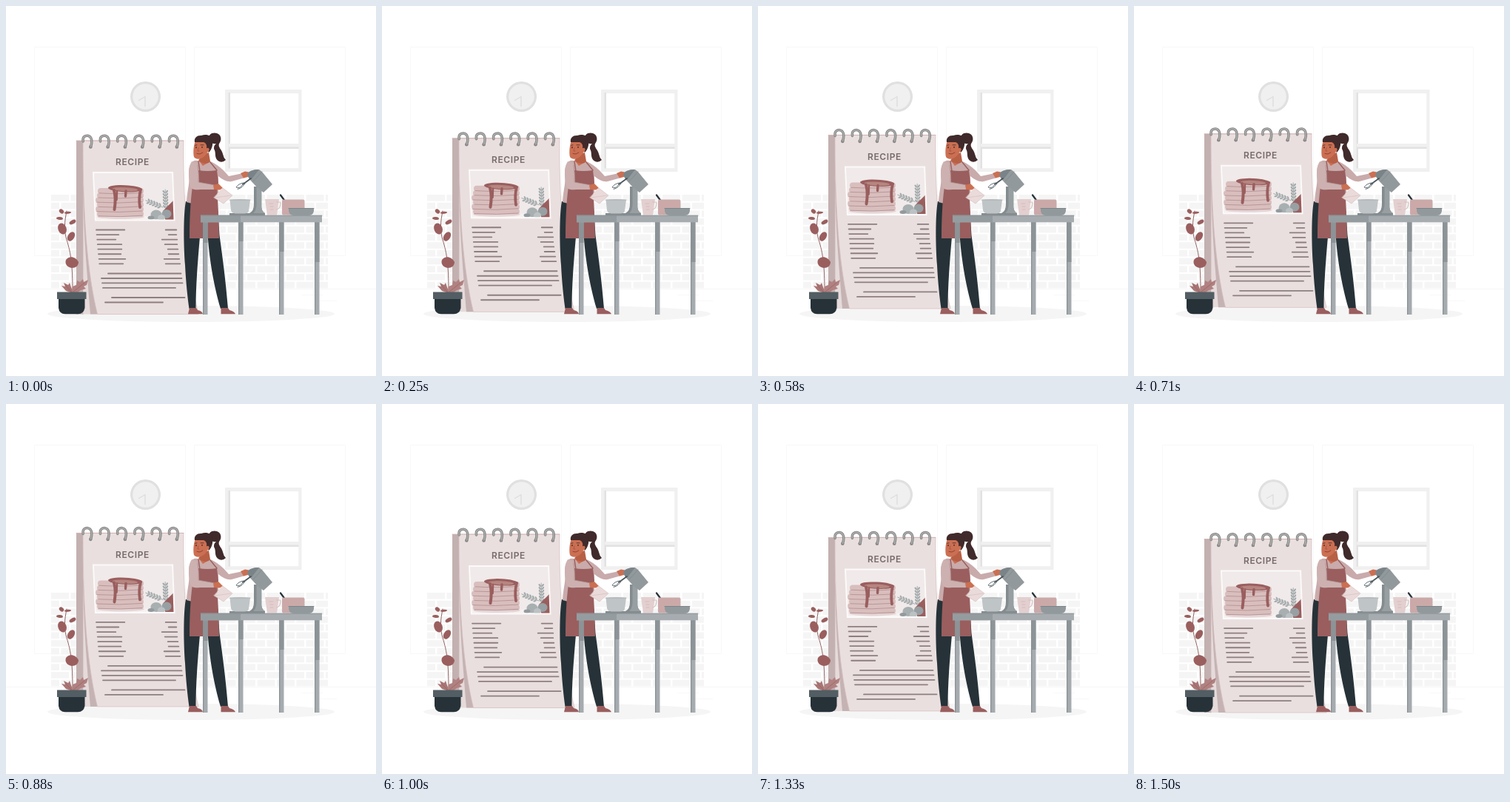
Animation of 500 by 500 pixels, one loop 1540 ms. Source, as an HTML page with a canvas:

```html
<!DOCTYPE html>
<html lang="en">
<head>
<meta charset="utf-8">
<title>Recipe</title>
<style>
  html, body { margin: 0; width: 100%; height: 100%; overflow: hidden; background: #fff; }
  canvas { display: block; width: 100vmin; height: 100vmin; }
</style>
</head>
<body>
<canvas id="stage"></canvas>
<script>
const SIZE = 500, LOOP = 1540, STEP = 1000 / 24;
const canvas = document.getElementById('stage');
const ctx = canvas.getContext('2d');
const ratio = window.devicePixelRatio || 1;
canvas.width = canvas.height = SIZE * ratio;

const INK = '#263238', BRICK = '#f5f5f5', WINE = '#9a5e5e', ROSE = '#c9abab',
      PAPER = '#eadfdf', SKIN = '#cb6f52', HAIR = '#412a2b', STEEL = '#92999c';

function fill(d, color) {
  ctx.fillStyle = color;
  ctx.fill(new Path2D(d));
}

function line(d, color, width = 1) {
  ctx.strokeStyle = color;
  ctx.lineWidth = width;
  ctx.stroke(new Path2D(d));
}

function rect(x, y, w, h, color, radius = 0) {
  ctx.fillStyle = color;
  ctx.beginPath();
  ctx.roundRect(x, y, w, h, radius);
  ctx.fill();
}

function oval(x, y, rx, ry, color, angle = 0) {
  ctx.fillStyle = color;
  ctx.beginPath();
  ctx.ellipse(x, y, rx, ry, angle, 0, 2 * Math.PI);
  ctx.fill();
}

function drawBricks() {
  ctx.save();
  ctx.beginPath();
  ctx.rect(61, 255, 374, 127);
  ctx.clip();
  for (let row = 0; row < 12; row++) {
    for (let x = 61 - (row % 2) * 13; x < 435; x += 26.5) {
      rect(x, 255 + row * 10.7, 24, 8.6, BRICK);
    }
  }
  ctx.restore();
}

function drawRoom() {
  rect(0, 0, SIZE, SIZE, '#fff');
  for (const x of [39, 255]) line(`M${x} 55.5h203.5v282h-203.5z`, '#f8f8f8');
  drawBricks();
  line('M0 382.4H500', '#f4f4f4', 0.8);
  line('M400 390.5H428M418 398.5H447', '#f7f7f7', 0.8);

  oval(188.5, 122.5, 20.5, 20.5, '#e0e0e0');
  oval(188.5, 122.5, 17.3, 17.3, '#f0f0f0');
  line('M188 135.5V122.5L179.5 127.5', '#dedede', 1.4);

  rect(296, 113, 103.5, 111, '#f0f0f0');
  rect(300.5, 117, 95, 102.5, '#e2e2e2');
  rect(303, 117.5, 92.5, 68.5, '#fff');
  rect(301, 186, 95, 4.5, '#f0f0f0');
  rect(303, 193, 92.5, 26.5, '#fff');

  oval(250, 416, 194, 11, BRICK);
}

function drawSprig(x, y, angle, length) {
  ctx.save();
  ctx.translate(x, y);
  ctx.rotate(angle);
  line(`M0 0H${length}`, '#98a0a1', 0.8);
  for (let i = 5; i < length; i += 4) {
    oval(i, -2, 2.4, 1.2, '#a5acad', -0.7);
    oval(i, 2, 2.4, 1.2, '#a5acad', 0.7);
  }
  ctx.restore();
}

function drawPancakes() {
  oval(155, 285, 32, 3, '#e5d6d6');
  for (let i = 5; i >= 0; i--) {
    const left = 121 + (i % 2) * 2 + (i === 0 ? 3 : 0), y = 246 + i * 6.2;
    const width = 186 - left;
    rect(left, y, width, 7.8, '#d9bebe', 3.9);
    line(`M${left + 2} ${y + 6.8}q30 2 ${width - 4}-.6`, '#b69292', 0.9);
  }
  oval(161, 246.8, 23, 4.6, WINE, 0.05);
  oval(161, 247.8, 17, 2.6, '#b68580', 0.05);
  line('M146 249Q149 260 146.5 275', WINE, 4);
  line('M150 250L149.5 262', WINE, 2.6);
  line('M162 250L161.5 257', WINE, 3.4);
  line('M182 248Q179 259 181 272', WINE, 3.8);
}

function drawPhoto() {
  fill('M117 224H226L228.5 290.5H120Z', '#fcfafa');
  ctx.save();
  ctx.clip(new Path2D('M119 226H224.2L226.5 288.5H121.8Z'));
  rect(115, 224, 115, 68, '#f1eaea');
  rect(115, 284, 115, 8, '#f7f2f2');
  drawPancakes();
  drawSprig(212, 272, 3.52, 25);
  drawSprig(216, 276, -1.6, 28);
  fill('M212 277L226 263L229 291H216Z', WINE);
  oval(203, 282, 7.5, 6.5, '#a8afb1');
  oval(217, 281, 6.5, 6, '#98a0a3');
  oval(210, 286, 5, 4, '#bcc2c3');
  oval(196, 286, 4.5, 2.5, '#929a9d');
  ctx.restore();
}

function drawRing(x) {
  const arch = `M${x - 5.8} 183C${x - 7} 176.5 ${x - 3} 175 ${x + 0.5} 175.2` +
               `C${x + 6} 176 ${x + 7} 183 ${x + 4.5} 190`;
  oval(x + 4.3, 190.4, 2.3, 2.3, '#8d8888');
  line(arch, '#858585', 3.5);
  line(arch, '#b0b0b0', 1.5);
}

function drawWriting() {
  ctx.fillStyle = '#776a6b';
  ctx.font = '600 12px Inter, "Open Sans", sans-serif';
  ctx.letterSpacing = '0.6px';
  ctx.textAlign = 'left';
  ctx.fillText('RECIPE', 148, 215.4);

  // Each row: end of the ingredient, start and end of the amount.
  const rows = [[161, 215, 231], [153, 219, 231], [149, 210, 232], [157, 214, 232],
                [157, 218, 233], [156, 219, 234], [162, 213, 235], [159, 215, 236]];
  rows.forEach(([end, from, to], i) => {
    const y = 302.5 + i * 6.55;
    line(`M${122 + i * 0.6} ${y}H${end - 0.7}M${from + 0.7} ${y}H${to - 0.7}`, '#8d7f80', 1.8);
  });
  const steps = [[361.5, 138, 237], [368, 129, 238], [374.4, 130, 239],
                 [380.9, 131, 229.5], [394, 143, 242], [400.5, 134, 212.5]];
  for (const [y, from, to] of steps) line(`M${from} ${y}H${to - 0.5}`, '#8d7f80', 1.8);
}

function drawNotepad() {
  rect(95, 182, 10, 234.5, '#c3b0b0');
  rect(104, 182, 136, 234.5, '#e6dada');
  line('M104 182V416.5', '#cbb5b5', 0.7);
  fill('M104 240C105 320 111 375 114 416.5H124L116 330Z', '#c5b3b3');
  const sheet = 'M104 182H240C239 245 244 350 260 416.5H123.5C110 360 104 290 104 182Z';
  fill(sheet, PAPER);
  line(sheet, '#d6bcbc', 0.7);
  line('M95 182H240', '#cfaeae', 0.8);
  drawPhoto();
  drawWriting();
  for (let i = 0; i < 6; i++) drawRing(110 + i * 23.3);
}

function drawPlant() {
  line('M90 387C90 350 88 335 82 316C78 303 79 292 82 277', '#8a5555', 0.9);
  fill('M89 354C83 353 79 349 81 343C85 337 94 338 98 346C98 351 94 354 89 354Z', WINE);
  oval(76, 301, 5.6, 7.8, WINE, -0.35);
  oval(88, 311.5, 4.4, 6.8, WINE, 0.55);
  oval(90, 292, 4.8, 2.6, WINE, -0.5);
  oval(72.5, 287, 4.5, 2, WINE, 0.1);
  oval(75, 277.5, 3.5, 2.6, WINE, 0.7);
  oval(83.5, 279.3, 4.5, 1.5, WINE, -0.1);
  fill('M87 387L81 385L75 378L80 379L78 374L84 377L86 374L88 380L91 387Z', '#a97675');
  fill('M89 387L90 379L95 377L96 371L100 373L104 369L105 373L111 370L109 377L105 379L108 382L101 384L97 387Z', '#b08180');
  line('M90 387L106 374M89 387L80 377', '#946463', 0.7);
  fill('M71 395H106.5V408Q105 416 97 416.3H80Q72 416 71 408Z', INK);
  rect(69, 386.5, 39.5, 9.5, '#525e63');
}

function drawHead() {
  // Bun and wavy ponytail.
  fill('M274 181C272 173 280 170 285 172C291 174 292 181 288 186C286 191 292 194 293 200' +
       'Q294 205 297 208Q293 212 288 210C281 206 284 200 282 195Q279 190 284 186Q277 187 274 181Z', HAIR);
  fill('M262 202L274 198L276 210Q271 216 261 210Z', '#b76046');
  fill('M255 185C253 192 253 200 254 204C257 208 263 207 267 204C273 200 276 190 274 182C267 178 258 178 255 185Z', SKIN);
  fill('M255 184C254 178 258 174.5 264 175C271 172.5 278 175 279 181C280 188 278 194 274 198L271 192C272 188 270 185 267 184Q260 184 255 184Z', HAIR);
  oval(272.3, 194.5, 2.2, 2.8, SKIN, 0.2);
  oval(257, 191.2, 0.8, 1.1, HAIR);
  oval(265, 190.8, 0.8, 1.1, HAIR);
  line('M255.5 188.3L258 187.8M263 187.8L267 187.8', HAIR, 0.8);
  line('M260 192L259 196H261', '#9f4c38', 0.7);
  line('M258 199.5Q262 201.5 266 198', '#8b3d34', 0.9);
}

function drawCook() {
  fill('M243 264C239.5 282 240 325 242 350C243 372 245.5 395 247.5 409H256.5C256.5 380 259 345 262 312' +
       'L272.5 308C274 335 280 376 290 409H300C297 373 293 342 288.5 310L285 258Z', INK);
  line('M262 313Q267 309 271 314', '#455056', 0.7);

  fill('M248 408H257L259 411Q265 412 266 416.3H246Z', WINE);
  fill('M290.5 408H300L302 411Q309 413 310 416.3H290.5Z', WINE);

  fill('M259 209C251 207 247 215 247 226C249 238 245 248 244 265L255 268L287 252' +
       'L287 230C293 235 299 238 305 237L323 232L320 226L301 230C292 219 285 214 276 210Z', ROSE);
  fill('M260 208L266 216L276 210L272 206L263 206Z', SKIN);
  fill('M260 222Q272 224 285 222L287 239L285 244Q287 271 288 314H248C248 291 249 265 252 244L261 240Z', WINE);
  line('M260 210L262 223M276 211L285 222', WINE, 1.4);
  line('M252 245Q270 248 285 241', '#814b4c', 0.8);

  fill('M251 210C246 218 246 231 249 243C250 248 256 249 262 248L281 248L282 242L260 238Q261 224 258 213Z', '#cdb1b1');
  line('M259 215Q261 228 260 238L282 242', '#ad8c8c', 0.7);
  fill('M280 242L287 240L293 246L289 248.5L281 248Z', SKIN);
  fill('M317 226L323 223.5L331 225L329 230.5L321 232.5Z', SKIN);

  fill('M293 246L306 256L294 267L281 259Z', '#eadada');
  line('M293 246L306 256L294 267L281 259ZM282 259L304 256', '#d3bcbc', 0.6);
  drawHead();
}

function drawMixer() {
  fill('M335 244H345V272Q346 278 350 280V283H302V280H329Q335 277 335 268Z', '#838b8e');
  fill('M338.5 244H345.5V272Q346 278 350 280H334Q338 277 338.5 268Z', '#989fa2');
  fill('M326 228C328 222.5 335 221 342 221L346 224L360 241L348 252L340 246L329 234Z', STEEL);
  fill('M326 228C328 222.5 335 221 342 221L332 234L329 234Z', '#7a8488');
  line('M346 224L334 237', '#7d8689', 0.7);
  line('M331 233L320 241', '#465055', 1.6);
  line('M321 239Q314 240 311 245Q317 248 321 239M324 238Q320 246 313 247.5', '#657075', 1);
}

function drawTable() {
  drawMixer();
  fill('M302.5 262Q316 260 330 262L328 277Q327 280.5 322 280.5H310Q305 280 304 276Z', '#bfc4c6');
  line('M302.5 262H330', '#a5abad', 0.8);

  fill('M350 261H369L366 282.5H353Z', '#e3cfcf');
  line('M366 265H371Q371 274 366 275', '#d5bcbc', 1.1);
  line('M356 267H361M357 271H361M357 275H361', '#cdb4b4', 0.7);
  line('M371 255.5L378 265', INK, 2.2);
  rect(373, 261.5, 30.5, 21, '#cba9a9', 2);
  fill('M382 273H416V277Q415 283 409 283H389Q383 283 382 277Z', STEEL);
  line('M382 273.5H416', '#798286', 0.9);

  for (const [x, shade] of [[266, 320], [314, 318], [369, 332], [417, 346]]) {
    rect(x, 291, 6.5, 126, '#a5abae');
    rect(x, 291, 6.5, shade - 291, '#8c9497');
    rect(x, 291, 1.3, 126, '#8a9295');
  }
  rect(263, 282.8, 164, 9.5, '#a6acaf');
  rect(263, 282.8, 54, 9.5, '#959c9f');
  line('M263 283.2H427', '#858d90', 0.7);
}

// Steady rise and fall of ten pixels, played at 24 steps a second.
function notepadShift(time) {
  const step = Math.min(36, Math.floor((time + 5) / STEP));
  return 0.54 - 10 * (1 - Math.abs(step - 17.5) / 18.5);
}

function draw(time) {
  ctx.setTransform(ratio, 0, 0, ratio, 0, 0);
  drawRoom();
  ctx.save();
  ctx.translate(0, notepadShift(time));
  drawNotepad();
  ctx.restore();
  drawPlant();
  drawCook();
  drawTable();
}

ctx.lineCap = ctx.lineJoin = 'round';
const start = performance.now();
function tick() {
  draw((performance.now() - start) % LOOP);
  requestAnimationFrame(tick);
}
tick();
</script>
</body>
</html>
```
